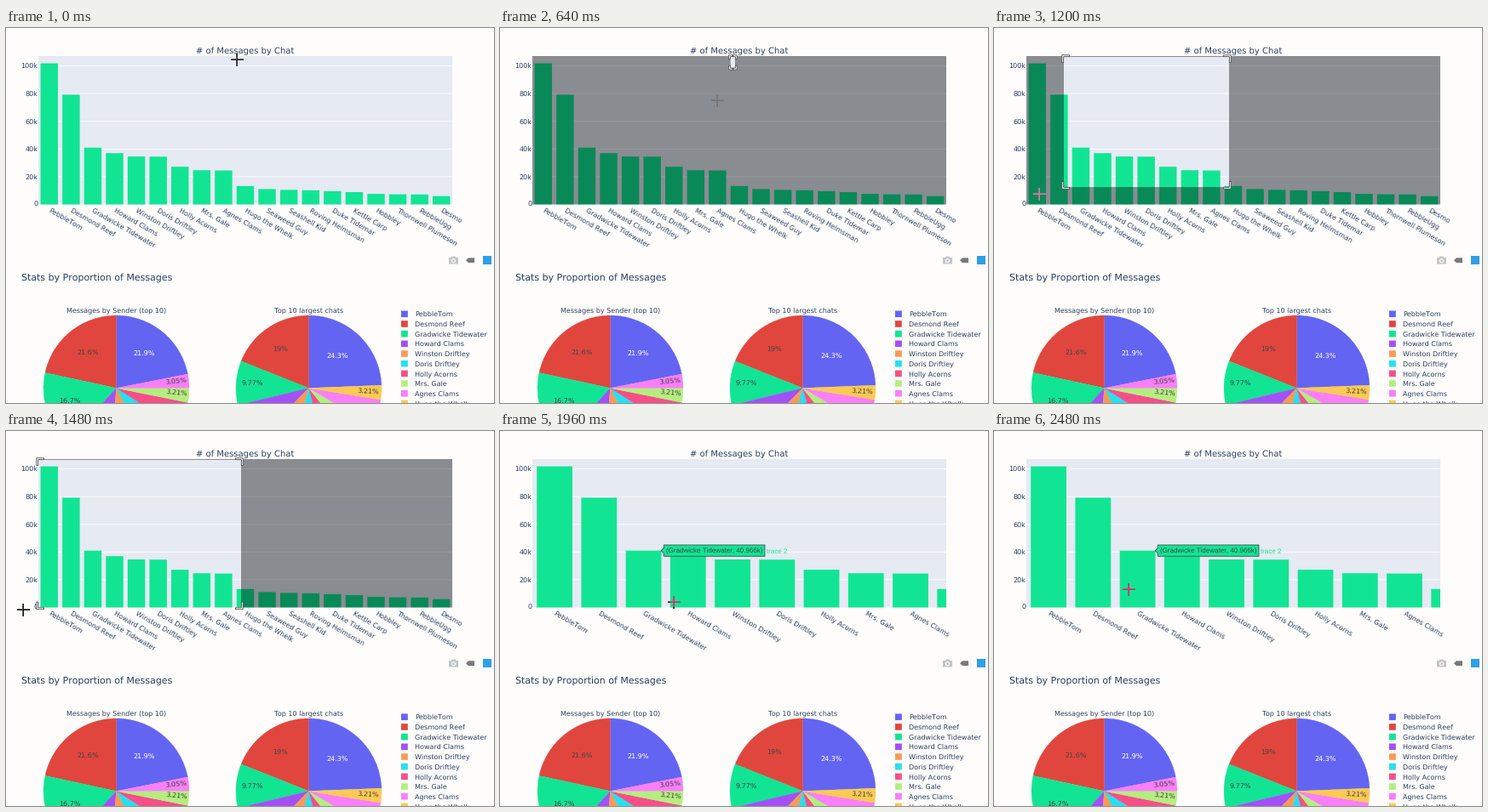
Write a matplotlib script that moves like this. It is 573 by 441 pixels and loops after 2520 ms.

```python
import numpy as np
import matplotlib.pyplot as plt
from matplotlib.animation import FuncAnimation
from matplotlib.colors import to_rgb
from matplotlib.patches import Circle, PathPatch, Polygon, Rectangle, Wedge
from matplotlib.path import Path

# Unhinted glyphs keep small text at its true width and height.
plt.rcParams["text.hinting"] = "none"
plt.rcParams["text.hinting_factor"] = 1

W, H, DPI = 573, 441, 100
FRAMES, STEP = 63, 40
PX = 72 / DPI

PAPER, PLOT_BG, INK, DARK = "#fefdfc", "#e5eaf3", "#2a3f5f", "#444444"
GREEN = "#11e594"
COLORS = ["#6464f3", "#e0463e", GREEN, "#a350f6", "#fa9a55",
          "#26e0f0", "#f64f88", "#b4ee80", "#f97ff8", "#fbca52"]

NAMES = ["PebbleTom", "Desmond Reef", "Gradwicke Tidewater", "Howard Clams",
         "Winston Driftley", "Doris Driftley", "Holly Acorns", "Mrs. Gale",
         "Agnes Clams", "Hugo the Whelk", "Seaweed Guy", "Seashell Kid",
         "Roving Helmsman", "Duke Tidemar", "Kettle Carp", "Hobbley",
         "Thornwell Plumeson", "PebbleUgg", "Desmo"]
COUNTS = [101.8, 79.2, 40.966, 37, 34.6, 34.5, 27.2, 24.7, 24.5, 13.3,
          11.1, 10.5, 10.2, 9.6, 8.9, 7.6, 7.3, 7.2, 6]
SENDERS = [21.9, 21.6, 16.7, 10.44, 9.1, 8.2, 5.8, 3.21, 3.05]

# Plot area and scales
LEFT, RIGHT, TOP, BASE = 38, 524, 33, 207.5
PX_PER_K = 1.63
WIDE = (RIGHT - LEFT) / len(NAMES)
ANCHOR_X, ANCHOR_Y = 276, 34
NEAR = WIDE * (RIGHT - LEFT) / (ANCHOR_X - LEFT)

# Pointer path: time, x, y
POINTER = np.array([
    (0, 271, 37), (480, 276, 34), (560, 276, 34), (820, 207, 201),
    (880, 206, 201), (1140, 82, 187), (1200, 53, 195), (1380, 20, 210),
    (1600, 20, 210), (1960, 204, 201), (2480, 158, 186)])
DRAG_START, RELEASE, HOVER_START, LAG = 640, 1600, 1920, 60

fig = plt.figure(figsize=(W / DPI, H / DPI), dpi=DPI, facecolor=PAPER)
ax = fig.add_axes([0, 0, 1, 1])
ax.axis("off")


def text(x, y, s, size=7.7, color=INK, ha="left", **kw):
    return ax.text(x, y, s, fontsize=size * PX, color=color, ha=ha,
                   va=kw.pop("va", "baseline"), **kw)


def rect(x, y, w, h, color, **kw):
    return ax.add_patch(Rectangle((x, y), w, h, fc=color, lw=0, snap=False,
                                  **kw))


def bar_top(i):
    return BASE - COUNTS[i] * PX_PER_K


# Bar chart
area = rect(LEFT, TOP, RIGHT - LEFT, BASE - TOP, PLOT_BG, zorder=0)
for k in range(0, 101, 20):
    y = BASE - k * PX_PER_K
    if k:
        ax.plot([LEFT, RIGHT], [y, y], color="white", lw=0.9 * PX, zorder=1,
                snap=False)
    text(37.3, y + 2.8, f"{k}k" if k else "0", ha="right")
text(281, 29.5, "# of Messages by Chat", 9.9, ha="center")

bars, labels = [], []
for i, name in enumerate(NAMES):
    bar = rect(0, bar_top(i), 1, BASE - bar_top(i), GREEN, zorder=2)
    bar.set_clip_path(area)
    bars.append(bar)
    labels.append(text(0, 215.8, name, rotation=-30, rotation_mode="anchor"))

# Mode bar
rect(520, 270, 11, 7.5, "#c3c5c8")
rect(523, 268.6, 5, 2, "#c3c5c8")
ax.add_patch(Circle((525.5, 273.7), 2.6, fc=PAPER, lw=0))
ax.add_patch(Circle((525.5, 273.7), 1.5, fc="#c3c5c8", lw=0))
ax.add_patch(Polygon([(540, 273.2), (543, 270.3), (550, 270.3),
                      (550, 276.1), (543, 276.1)], fc="#77797c", lw=0))
rect(560, 268, 10, 10, "#2f9fe8")

# Pies
text(17.5, 296.5, "Stats by Proportion of Messages", 10.56)


def pie(cx, title, values, notes):
    cy, r = 423.5, 85.5
    text(cx, 334.6, title, 7.87, ha="center")
    sizes = np.array(values) / sum(values) * 360
    # The y axis points down, so growing angles run clockwise on screen.
    stop = -90 + sizes[0]
    for size, color in zip(sizes, COLORS):
        # A hairline in the slice colour closes the seams.
        ax.add_patch(Wedge((cx, cy), r, stop - size, stop, fc=color,
                           ec=color, lw=0.3 * PX))
        stop -= size
    for x, y, label, color, turn in notes:
        text(x, y, label, color=color, ha="center", va="center",
             rotation=turn)


pie(129.5, "Messages by Sender (top 10)", SENDERS,
    [(162.5, 383.5, "21.9%", "white", 0), (96, 382.5, "21.6%", DARK, 0),
     (75, 440, "16.7%", DARK, 0), (200, 416.3, "3.05%", DARK, 5.7),
     (200.5, 430, "3.21%", DARK, -5.6)])
pie(355.5, "Top 10 largest chats", COUNTS[:10],
    [(389.5, 387, "24.3%", "white", 0), (322, 378.5, "19%", DARK, 0),
     (289, 419, "9.77%", DARK, 0), (425, 428, "3.21%", DARK, -3.2)])

for i, color in enumerate(COLORS):
    y = 336.3 + 11.68 * i
    rect(464, y - 3.8, 7.8, 7.6, color)
    text(480, y + 2.8, NAMES[i])

# Zoom box
shade = ax.add_patch(PathPatch(Path([(0, 0)]), fc="black", alpha=0.4, lw=0,
                               snap=False, zorder=5))
corners = ax.add_patch(PathPatch(Path([(0, 0)]), fc="white", ec=DARK,
                                 lw=0.8 * PX, snap=False, zorder=6))

# Hover label
tip_y = bar_top(2)
tip = [
    ax.add_patch(Polygon([(189, tip_y), (192.3, tip_y - 3), (192.3, 134),
                          (311, 134), (311, 147.3), (192.3, 147.3),
                          (192.3, tip_y + 3)],
                         fc=GREEN, ec=DARK, lw=0.8 * PX, zorder=7)),
    text(195, 143.6, f"({NAMES[2]}, {COUNTS[2]}k)", 8.08, DARK,
         family="Liberation Sans", zorder=8),
    text(313, 143.6, "trace 2", 8.08, GREEN, family="Liberation Sans",
         zorder=8),
]

ARM = 7
SIDE = 2 * ARM + 1
cursor = ax.imshow(np.zeros((SIDE, SIDE, 4)), interpolation="nearest",
                   aspect="auto", zorder=9)
ax.set_xlim(0, W)
ax.set_ylim(H, 0)


def pointer(t):
    return [np.interp(t, POINTER[:, 0], POINTER[:, k]) for k in (1, 2)]


def loop(points):
    codes = [Path.MOVETO] + [Path.LINETO] * (len(points) - 1)
    return Path(list(points) + [points[0]], codes + [Path.CLOSEPOLY])


def zoom_paths(l, t, r, b):
    outer = [(LEFT, TOP), (RIGHT, TOP), (RIGHT, BASE), (LEFT, BASE)]
    inner = [(l, t), (l, b), (r, b), (r, t)]
    mask = Path.make_compound_path(loop(outer), loop(inner))
    arm = min(r - l, b - t, 13) / 2
    ell = np.array([(-2.2, arm), (-0.3, arm), (-0.3, -0.3), (arm, -0.3),
                    (arm, -2.2), (-2.2, -2.2)])
    marks = [loop(ell * (sx, sy) + (x, y))
             for x, sx in ((l, 1), (r, -1)) for y, sy in ((t, 1), (b, -1))]
    return mask, Path.make_compound_path(*marks)


def backdrop(x, y, spacing, box):
    """Colour under the pointer at one pixel."""
    if not (LEFT <= x < RIGHT and TOP <= y < BASE):
        return np.array(to_rgb(PAPER))
    slot, part = divmod((x - LEFT) / spacing, 1)
    on_bar = 0.1 <= part <= 0.9 and y >= bar_top(int(slot))
    rgb = np.array(to_rgb(GREEN if on_bar else PLOT_BG))
    if box:
        l, t, r, b = box
        if not (l <= x <= r and t <= y <= b):
            rgb = rgb * 0.6
    return rgb


def draw_cursor(x, y, spacing, box):
    """A crosshair that inverts what lies below it."""
    x0, y0 = round(x) - ARM, round(y) - ARM
    pixels = np.zeros((SIDE, SIDE, 4))
    for k in range(SIDE):
        for side, alpha in ((ARM - 1, 0.65), (ARM, 0.92)):
            for row, col in ((k, side), (side, k)):
                rgb = 1 - backdrop(x0 + col + .5, y0 + row + .5, spacing, box)
                pixels[row, col] = (*rgb, max(alpha, pixels[row, col, 3]))
    cursor.set_data(pixels)
    cursor.set_extent((x0, x0 + SIDE, y0 + SIDE, y0))


def update(i):
    t = i * STEP
    spacing = NEAR if t >= RELEASE else WIDE
    for k, (bar, label) in enumerate(zip(bars, labels)):
        x = LEFT + spacing * (k + 0.5)
        bar.set_x(x - 0.4 * spacing)
        bar.set_width(0.8 * spacing)
        label.set_x(x - 1.6)
        label.set_visible(x < RIGHT)

    box = None
    if DRAG_START <= t < RELEASE:
        x, y = pointer(t - LAG)
        box = max(x, LEFT), ANCHOR_Y, ANCHOR_X, min(y, BASE)
        mask, marks = zoom_paths(*box)
        shade.set_path(mask)
        corners.set_path(marks)
    shade.set_visible(box is not None)
    corners.set_visible(box is not None)

    for part in tip:
        part.set_visible(t >= HOVER_START)
    draw_cursor(*pointer(t), spacing, box)
    return []


anim = FuncAnimation(fig, update, frames=FRAMES, interval=STEP, repeat=True,
                     repeat_delay=0, blit=False)
plt.show()
```
